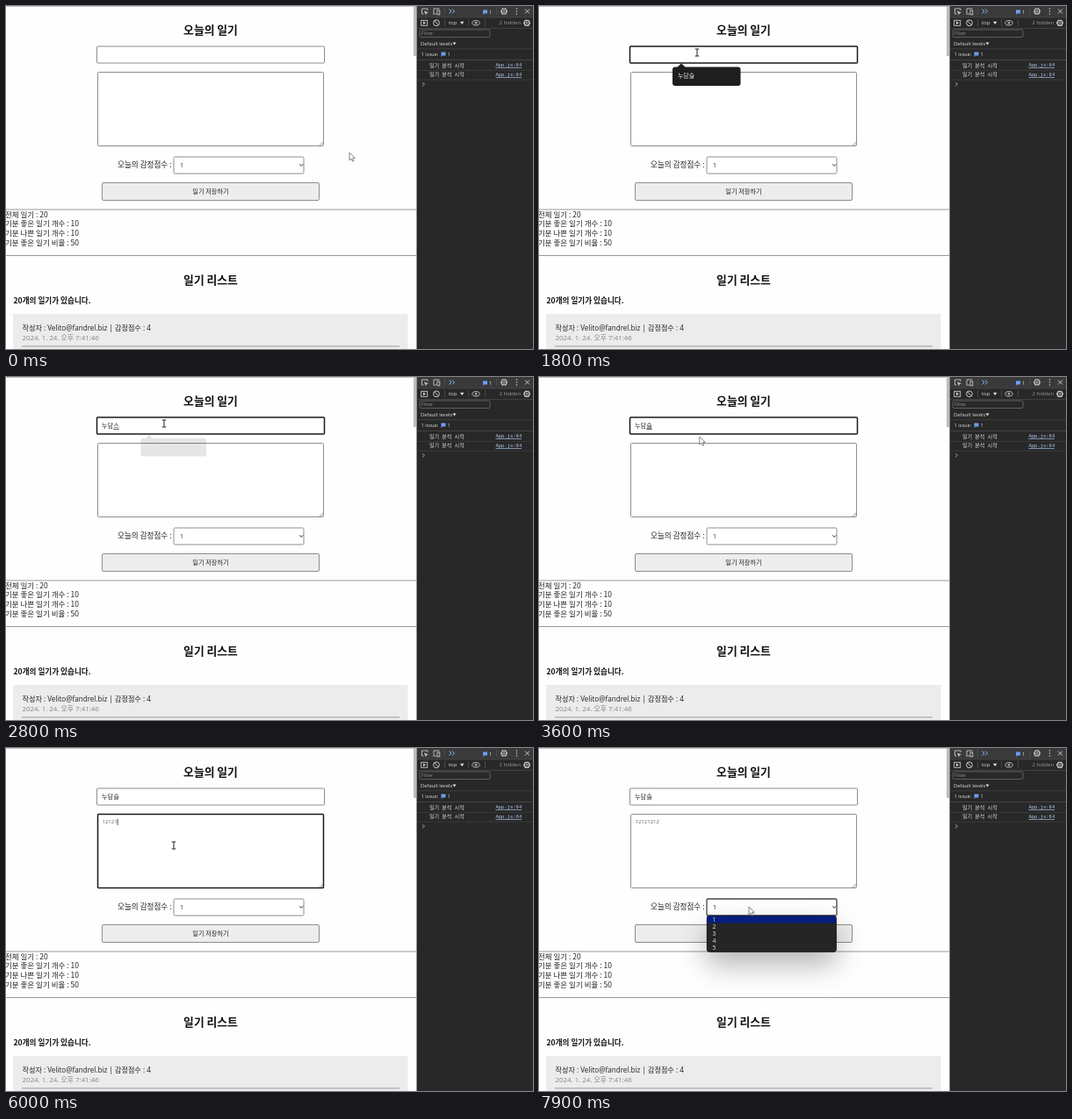
Write an HTML page with a canvas that moves like this. It is 600x391 px and loops after 8000 ms.

```html
<!DOCTYPE html>
<html lang="ko">
<head>
<meta charset="utf-8">
<title>오늘의 일기</title>
<style>
html, body { margin: 0; width: 100%; height: 100%; overflow: hidden; background: #fefefe; }
canvas { display: block; }
</style>
</head>
<body>
<canvas id="stage" width="600" height="391"></canvas>
<script>
const ctx = document.getElementById('stage').getContext('2d');
const LOOP = 8000, STEP = 100;
const SANS = '"Open Sans", "Noto Sans CJK KR", "Noto Sans CJK", sans-serif';
const KOR = '"Noto Sans CJK KR", "Noto Sans CJK", sans-serif';
const MONO = '"Noto Sans Mono CJK KR", "Noto Sans CJK KR", monospace';
const CODE = '"Liberation Mono", monospace';
const BORDER = '#8e8e8e', RULE = '#9a9a9a';

// Input method steps for the name, then the diary keys
const NAME = ['ㄴ', '누', '눋', '누다', '누담', '누담ㅅ', '누담스', '누담슬'];
const NAME_START = 1900, NAME_GAP = 150;
const KEYS = [4600, 4700, 5200, 5500, 6000, 6300, 6600, 6800];
const CLICK = { input: 1600, area: 4200, select: 7700 };
const PATH = [
  [0, 391, 167], [100, 391, 167], [1000, 186, 56], [1400, 180, 53],
  [3400, 180, 53], [4000, 191, 111], [7400, 191, 111], [7700, 239, 181]
];

const clamp = v => Math.max(0, Math.min(1, v));
const ease = v => v * v * (3 - 2 * v);

function text(str, x, mid, size, color, opt = {}) {
  ctx.font = `${opt.weight || 400} ${size}px ${opt.font || SANS}`;
  ctx.textAlign = opt.align || 'left';
  ctx.fillStyle = color;
  ctx.fillText(str, x, mid + size * 0.33);
}

function rect(x, y, w, h, color) {
  ctx.fillStyle = color;
  ctx.fillRect(x, y, w, h);
}

function box(x, y, w, h, r, fill, line, width = 1) {
  ctx.beginPath();
  ctx.roundRect(x, y, w, h, r);
  if (fill) { ctx.fillStyle = fill; ctx.fill(); }
  if (line) { ctx.strokeStyle = line; ctx.lineWidth = width; ctx.stroke(); }
}

function lines(color, width, ...paths) {
  ctx.strokeStyle = color;
  ctx.lineWidth = width;
  ctx.beginPath();
  for (const p of paths) {
    ctx.moveTo(p[0], p[1]);
    for (let i = 2; i < p.length; i += 2) ctx.lineTo(p[i], p[i + 1]);
  }
  ctx.stroke();
}

function poly(color, ...p) {
  ctx.fillStyle = color;
  ctx.beginPath();
  for (let i = 0; i < p.length; i += 2) ctx.lineTo(p[i], p[i + 1]);
  ctx.closePath();
  ctx.fill();
}

function ring(x, y, r, color, width = 1) {
  ctx.strokeStyle = color;
  ctx.lineWidth = width;
  ctx.beginPath();
  ctx.arc(x, y, r, 0, Math.PI * 2);
  ctx.stroke();
}

function field(x, y, w, h, focused) {
  if (focused) box(x, y, w, h, 1, '#fff', '#1a1a1a', 1.5);
  else box(x, y, w, h, 1, '#fff', BORDER, 1);
}

function page() {
  rect(0, 0, 468, 391, '#fefefe');
  rect(0, 0, 468, 1, '#c4c4c4');
  text('오늘의 일기', 233, 28, 12.8, '#111', { weight: 700, align: 'center', font: KOR });
  text('오늘의 감정점수 :', 127, 181, 8.6, '#222', { font: KOR });
  box(109.5, 201.5, 247, 20, 1.5, '#ededed', BORDER);
  text('일기 저장하기', 233, 211.5, 7.2, '#222', { align: 'center', font: KOR });

  rect(0, 231.5, 468, 1, RULE);
  ['전체 일기 : 20', '기분 좋은 일기 개수 : 10', '기분 나쁜 일기 개수 : 10', '기분 좋은 일기 비율 : 50']
    .forEach((s, i) => text(s, -1, 238 + i * 10.6, 8.5, '#222', { font: KOR }));
  rect(0, 284, 468, 1, RULE);

  text('일기 리스트', 233, 312.5, 12.8, '#111', { weight: 700, align: 'center', font: KOR });
  text('20개의 일기가 있습니다.', 8.5, 336.5, 8.6, '#111', { weight: 700, font: KOR });
  rect(8, 351, 449.5, 40, '#ececec');
  text('작성자 : Velito@fandrel.biz | 감정점수 : 4', 18.5, 367.5, 8.1, '#222');
  text('2024. 1. 24. 오후 7:41:46', 18.5, 378.5, 7.9, '#858585');
  rect(18, 387.4, 430, 1, RULE);
  rect(464, 0, 3, 57, '#bdbdbd');
  rect(467, 0, 1, 391, '#949494');
}

function gear(x, y) {
  ring(x, y, 3, '#c8c8c8', 1.2);
  ring(x, y, 1.1, '#c8c8c8', 0.8);
  for (let i = 0; i < 6; i++) {
    const c = Math.cos(i * Math.PI / 3), s = Math.sin(i * Math.PI / 3);
    lines('#c8c8c8', 1.2, [x + c * 3, y + s * 3, x + c * 4, y + s * 4]);
  }
}

function bubble(x, y) {
  rect(x, y, 5, 4, '#6d9df0');
  poly('#6d9df0', x, y + 4, x + 2, y + 4, x, y + 5.5);
}

function devtools() {
  const icon = '#c8c8c8', sep = '#555';
  rect(468, 0, 132, 391, '#282828');
  rect(468, 0, 132, 12.5, '#3a3a3a');
  rect(468, 12.5, 132, 0.8, '#505050');
  rect(468, 25, 132, 0.8, '#484848');

  lines(icon, 0.9, [475.5, 9, 473.5, 9, 473.5, 3, 480, 3, 480, 5]);
  poly(icon, 476, 5.5, 481, 7.5, 478.7, 8.2, 478, 10.5);
  lines(icon, 0.9, [487, 8, 487, 3, 493.5, 3], [486, 9, 490, 9]);
  ctx.strokeRect(491, 5, 2.8, 4.8);
  rect(499, 2, 0.7, 8, sep);
  lines('#8ab4f8', 1, [504.5, 3.5, 507, 6, 504.5, 8.5], [508, 3.5, 510.5, 6, 508, 8.5]);
  bubble(543, 4.5);
  text('1', 550, 7, 5.8, '#ddd');
  rect(558, 2, 0.7, 8, sep);
  gear(567, 6);
  for (const y of [3, 6, 9]) rect(580.8, y - 0.6, 1.3, 1.3, icon);
  lines(icon, 1, [591, 3.5, 596, 8.5], [596, 3.5, 591, 8.5]);

  ctx.strokeStyle = icon;
  ctx.lineWidth = 0.9;
  ctx.strokeRect(472.7, 16.3, 7, 6);
  poly(icon, 475, 17.3, 478, 19.3, 475, 21.3);
  ring(490, 19.3, 3.4, icon, 1);
  lines(icon, 1, [487.6, 16.9, 492.4, 21.7]);
  rect(499, 15, 0.7, 8, sep);
  text('top', 504, 19.3, 6, '#ddd');
  poly('#ddd', 517, 17.8, 521.5, 17.8, 519.2, 21);
  rect(526, 15, 0.7, 8, sep);
  ctx.strokeStyle = icon;
  ctx.lineWidth = 0.9;
  ctx.beginPath();
  ctx.ellipse(535, 19.3, 4.2, 2.7, 0, 0, Math.PI * 2);
  ctx.stroke();
  ring(535, 19.3, 1, icon, 1);
  rect(545, 15, 0.7, 8, sep);
  text('2 hidden', 561.5, 19.5, 6, '#9a9a9a');
  gear(593, 19.3);

  box(471, 27, 80, 8.5, 1.5, '#282828', '#6c6c6c', 0.8);
  text('Filter', 473, 31.5, 5.6, '#929292');
  text('Default levels', 472, 43, 5.8, '#ddd');
  poly('#ddd', 508.5, 41.5, 512.5, 41.5, 510.5, 44.5);
  rect(468, 48.5, 132, 0.7, '#444');
  text('1 issue:', 472.5, 54.8, 5.7, '#ddd');
  bubble(495.5, 52.5);
  text('1', 502.5, 54.8, 5.7, '#ddd');
  rect(468, 61, 132, 0.7, '#505050');

  for (const y of [67.5, 78.4]) {
    text('일기 분석 시작', 482, y, 6.1, '#d8d8d8', { font: MONO });
    text('App.js:64', 557.5, y, 5.5, '#b5cdf0', { font: CODE });
    rect(557.5, y + 2.6, 29.5, 0.7, '#a8c0e4');
    rect(468, y + 5.4, 132, 0.7, '#404040');
  }
  lines('#8aa4cc', 0.9, [474, 87.3, 476.6, 89.3, 474, 91.3]);
}

function nameField(t) {
  field(103.5, 46, 259, 19, t >= CLICK.input && t < CLICK.area);
  const n = Math.floor((t - NAME_START) / NAME_GAP);
  if (n < 0) return;
  const str = NAME[Math.min(n, NAME.length - 1)];
  text(str, 109, 55.5, 7.2, '#222', { font: KOR });
  if (t < CLICK.area) {
    const before = ctx.measureText(str.slice(0, -1)).width;
    const w = ctx.measureText(str.slice(-1)).width;
    rect(109 + before, 59, w, 0.8, '#333');
  }
}

function diaryField(t) {
  const focused = t >= CLICK.area && t < CLICK.select;
  field(104.5, 75.5, 257, 84, focused);
  lines('#777', 0.7, [357, 159, 361, 155], [359.3, 159, 361, 157.3]);
  const typed = KEYS.filter(k => k <= t);
  const str = '12121212'.slice(0, typed.length);
  text(str, 109.5, 84.5, 6, '#5c5c5c');
  const since = t - (typed.length ? typed[typed.length - 1] : CLICK.area);
  if (focused && since % 1000 < 500) {
    rect(109.5 + ctx.measureText(str).width, 80.8, 0.8, 7.2, '#222');
  }
}

function suggestion(t) {
  const alpha = t < 2000 ? clamp((t - CLICK.input) / 100) : clamp((2900 - t) / 900);
  if (!alpha) return;
  const s = t < 2000 ? 1 : 0.96 + 0.04 * alpha;
  ctx.save();
  ctx.globalAlpha = alpha;
  ctx.translate(190.5, 80);
  ctx.scale(s, s);
  ctx.translate(-190.5, -80);
  ctx.fillStyle = '#1e1e1e';
  ctx.beginPath();
  ctx.roundRect(152, 69.5, 77.5, 21.5, 3);
  ctx.moveTo(157.5, 69.6);
  ctx.lineTo(162, 65.5);
  ctx.lineTo(166.5, 69.6);
  ctx.fill();
  text(NAME[NAME.length - 1], 158, 80, 6.9, '#f2f2f2', { font: KOR });
  ctx.restore();
}

function score(t) {
  const open = t >= CLICK.select;
  box(191, 172, 148, 19, 1.5, '#fff', open ? '#444' : BORDER, open ? 1.3 : 1);
  text('1', 198, 181.5, 7, '#222');
  lines('#333', 1, [334.2, 180.3, 336.2, 182.5, 338.2, 180.3]);
}

function menu(t) {
  if (t < CLICK.select + 100) return;
  ctx.save();
  ctx.shadowColor = 'rgba(0,0,0,0.3)';
  ctx.shadowBlur = 32;
  ctx.shadowOffsetY = 14;
  box(191, 191, 147.5, 41.5, 3, '#252525');
  ctx.restore();
  box(191.3, 191.3, 147, 41, 3, '#252525', '#171717', 0.8);
  rect(191.5, 191.5, 146.5, 8, '#041d80');
  for (let i = 0; i < 5; i++) text(String(i + 1), 197.5, 195.3 + i * 8.15, 6.8, '#e8e8e8');
}

function mouseAt(t) {
  let i = 1;
  while (i < PATH.length - 1 && PATH[i][0] < t) i++;
  const a = PATH[i - 1], b = PATH[i];
  const k = ease(clamp((t - a[0]) / (b[0] - a[0])));
  return [a[1] + (b[1] - a[1]) * k, a[2] + (b[2] - a[2]) * k];
}

function mouse(t) {
  const [x, y] = mouseAt(t);
  const overText = x > 103 && x < 363 && ((y > 46 && y < 65) || (y > 75 && y < 160));
  if (overText) {
    lines('#222', 1, [x, y - 4, x, y + 4],
      [x - 2.3, y - 4, x + 2.3, y - 4], [x - 2.3, y + 4, x + 2.3, y + 4]);
    return;
  }
  const p = [0, 0, 0, 9, 2.1, 7.1, 3.6, 10.2, 5, 9.5, 3.6, 6.5, 6.3, 6.3];
  ctx.beginPath();
  for (let i = 0; i < p.length; i += 2) ctx.lineTo(x + p[i], y + p[i + 1]);
  ctx.closePath();
  ctx.fillStyle = '#fff';
  ctx.fill();
  ctx.strokeStyle = '#666';
  ctx.lineWidth = 0.8;
  ctx.stroke();
}

function draw(t) {
  page();
  nameField(t);
  diaryField(t);
  score(t);
  suggestion(t);
  menu(t);
  devtools();
  mouse(t);
}

const start = performance.now();
function tick() {
  const t = (performance.now() - start) % LOOP;
  draw(Math.floor(t / STEP) * STEP);
  requestAnimationFrame(tick);
}
tick();
</script>
</body>
</html>
```
